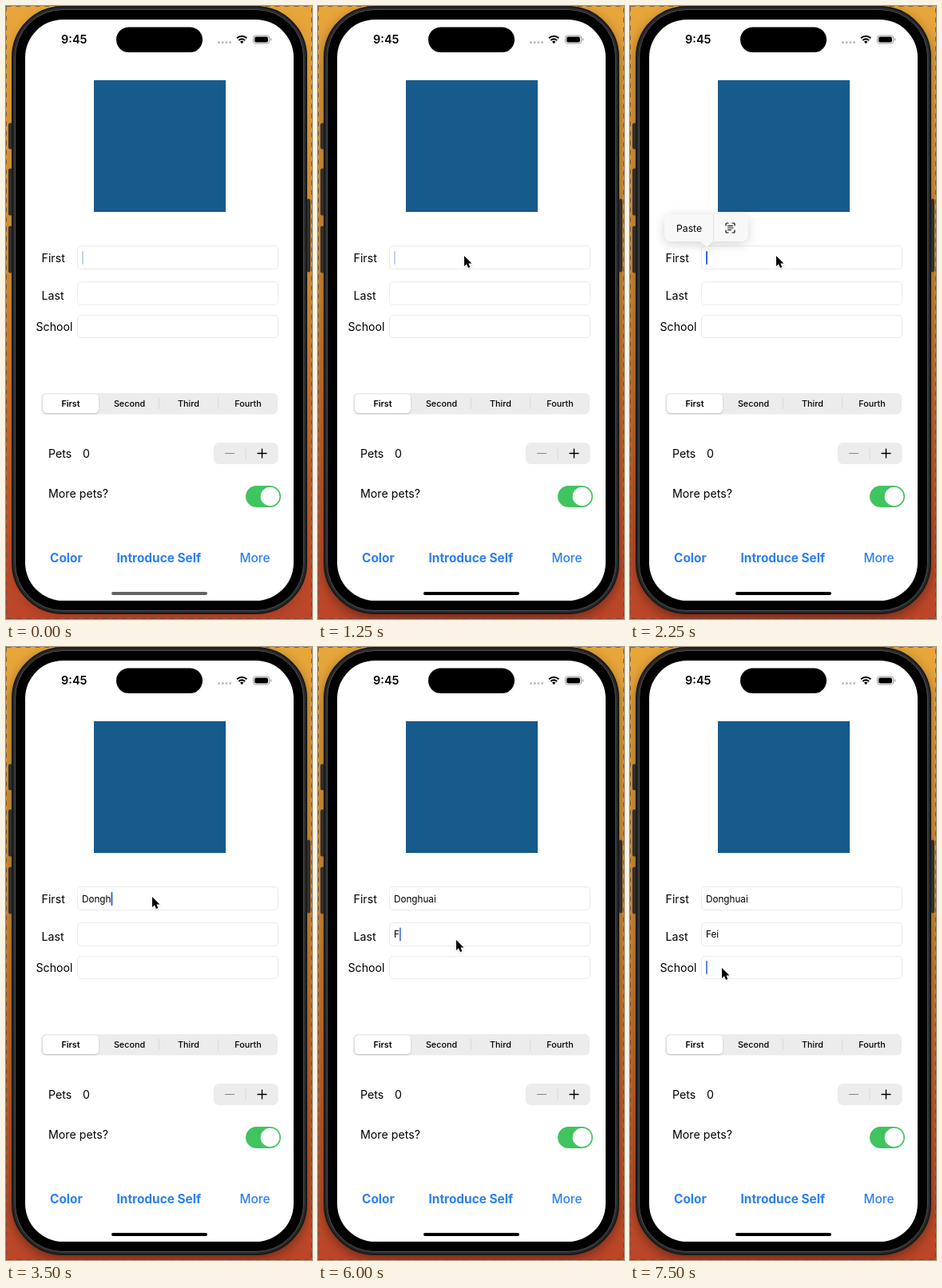
Recreate the animation shown at these times as an HTML page. Size 383 by 768 pixels, loop 8000 ms.

```html
<!DOCTYPE html>
<html lang="en">
<head>
<meta charset="utf-8">
<title>Form on a phone</title>
<style>
  html, body { margin: 0; width: 100%; height: 100%; overflow: hidden; }
  svg { display: block; width: 383px; height: 768px; }
  text { font: 14.2px Inter, "Open Sans", sans-serif; }
  .bold { font-weight: 700; font-size: 15.4px; fill: #2a7ff5; }
  .seg { font-size: 10.8px; font-weight: 500; text-anchor: middle; }
  .entry { font-size: 11.7px; }
  .field { fill: #fff; stroke: #ebebeb; }
  .line { fill: none; stroke: #000; stroke-width: 1.2; stroke-linecap: round; }
</style>
</head>
<body>
<svg viewBox="0 0 383 768">
  <defs>
    <linearGradient id="sky" x2="0" y2="1">
      <stop offset="0" stop-color="#e8a63a"/>
      <stop offset=".45" stop-color="#d48c32"/>
      <stop offset=".8" stop-color="#c45a28"/>
      <stop offset="1" stop-color="#bd4528"/>
    </linearGradient>
    <filter id="soft" x="-30%" y="-60%" width="160%" height="240%">
      <feDropShadow dx="0" dy="3" stdDeviation="7" flood-opacity=".17"/>
    </filter>
    <filter id="lift" x="-20%" y="-30%" width="140%" height="170%">
      <feDropShadow dx="0" dy="1" stdDeviation="1.2" flood-opacity=".2"/>
    </filter>
    <filter id="blur" x="-10%" y="-10%" width="120%" height="120%">
      <feGaussianBlur stdDeviation="8"/>
    </filter>
  </defs>

  <rect width="383" height="768" fill="url(#sky)"/>
  <rect id="shade" x="8" y="6" width="368" height="760" rx="63" filter="url(#blur)"/>
  <rect x=".5" y=".5" width="382" height="767" fill="none" stroke="#4a4640" stroke-opacity=".7" stroke-dasharray="6 6"/>

  <!-- phone body -->
  <path d="M5.500 149v28M5.500 206v54M5.500 278v54M378.500 244v87" stroke="#303030" stroke-width="5" stroke-linecap="round"/>
  <rect x="8" y="1" width="368" height="760" rx="63" fill="#2b2b2b" stroke="#1a1a1a" stroke-width="2"/>
  <rect x="11.500" y="4.500" width="361" height="753" rx="59.500" stroke="#505050"/>
  <rect x="24" y="17" width="336" height="728" rx="47.500" fill="#fff"/>

  <!-- status bar -->
  <text x="69" y="47.300" style="font-size:14.5px;font-weight:600">9:45</text>
  <rect x="138" y="26.500" width="108" height="31.500" rx="15.750"/>
  <path d="M266.500 45.500h15" stroke="#b9b9b9" stroke-width="3" stroke-linecap="round" stroke-dasharray="0 4.7"/>
  <path d="M289 40.300q6.200-5.200 12.400 0M291.300 43q3.900-3.200 7.800 0" fill="none" stroke="#000" stroke-width="2"/>
  <path d="M292.900 44.600q2.300-1.700 4.600 0l-2.300 2.600z"/>
  <rect x="309.500" y="37" width="20" height="10" rx="3" fill="none" stroke="#999"/>
  <rect x="311" y="38.500" width="17" height="7" rx="2"/>
  <path d="M331.500 40.500v3" stroke="#999" stroke-width="1.300"/>

  <rect x="110" y="93" width="165" height="165" fill="#175a8c"/>

  <!-- form -->
  <text x="44.500" y="321">First</text>
  <text x="44.500" y="368">Last</text>
  <text x="37.500" y="407">School</text>
  <rect class="field" x="89.500" y="300.500" width="251" height="29" rx="4.500"/>
  <rect class="field" x="89.500" y="345.500" width="251" height="29" rx="4.500"/>
  <rect class="field" x="89.500" y="387.500" width="251" height="28" rx="4.500"/>
  <text class="entry" x="95" y="319.500"></text>
  <text class="entry" x="95" y="364"></text>
  <text class="entry" x="95" y="406"></text>
  <rect id="caret" width="2" height="17" rx="1" fill="#3567dc"/>

  <rect x="44" y="485" width="296" height="26.500" rx="6" fill="#ececed"/>
  <path d="M191.500 491v14M265.500 491v14" stroke="#dadadc"/>
  <rect x="46" y="486.500" width="70" height="23.500" rx="5" fill="#fff" filter="url(#lift)"/>
  <text class="seg" x="81" y="502" style="font-weight:600">First</text>
  <text class="seg" x="154.500" y="502">Second</text>
  <text class="seg" x="228.500" y="502">Third</text>
  <text class="seg" x="303" y="502">Fourth</text>

  <text x="53" y="566">Pets</text>
  <text x="96" y="566">0</text>
  <rect x="260" y="547" width="80.500" height="27" rx="6.500" fill="#ececed"/>
  <path d="M300 553v15" stroke="#d8d8da"/>
  <path class="line" d="M274.500 560.500h11" style="stroke:#858587"/>
  <path class="line" d="M315 560.500h11M320.500 555v11" style="stroke-width:1.400"/>
  <text x="53" y="616">More pets?</text>
  <rect x="300" y="601" width="44" height="27" rx="13.500" fill="#40c45f"/>
  <circle cx="330.500" cy="614.500" r="11.800" fill="#fff"/>

  <text class="bold" x="55" y="697">Color</text>
  <text class="bold" x="138.500" y="697">Introduce Self</text>
  <text class="bold" x="292.500" y="697" style="font-weight:500">More</text>
  <rect id="home" x="132" y="734" width="120" height="4" rx="2"/>

  <g id="menu">
    <path d="M52 261h87a9 9 0 0 1 9 9v16a9 9 0 0 1-9 9h-34q-3 0-5 3l-4 4-4-4q-2-3-5-3h-35a9 9 0 0 1-9-9v-16a9 9 0 0 1 9-9z" fill="#f8f8f8" filter="url(#soft)"/>
    <path d="M104.500 261v34" stroke="#e0e0e0"/>
    <text x="58" y="282.500" style="font-size:12.200px">Paste</text>
    <path class="line" d="M120 275v-2q0-1 1-1h2M128 272h2q1 0 1 1v2M131 281v2q0 1-1 1h-2M123 284h-2q-1 0-1-1v-2M122.500 275.500h6M122.500 278h6.500M122.500 280.500h4"/>
  </g>

  <path id="pointer" d="M0 0v13l3-2.700 2 4.700 2.400-1.100-2-4.500h4.100z" stroke="#fff" stroke-width="1.600" paint-order="stroke" filter="url(#lift)"/>
</svg>
<script>
  const LOOP = 8000, STEP = 250;
  const byId = id => document.getElementById(id);
  const [shade, caret, home, menu, pointer] = ['shade', 'caret', 'home', 'menu', 'pointer'].map(byId);
  const entries = [...document.querySelectorAll('.entry')];
  const caretTops = [307, 351.5, 393];

  // Each row starts with the time from which its values hold.
  const typing = [
    { word: 'Donghuai', keys: [[0, 0], [2750, 1], [3000, 2], [3250, 4], [3500, 5], [3750, 6], [4000, 8]] },
    { word: 'Fei', keys: [[0, 0], [5750, 1], [6250, 2], [6500, 3]] },
    { word: '', keys: [[0, 0]] }
  ];
  const path = [
    [500, 214, 372], [750, 190, 327], [1000, 183, 313],
    [4500, 181, 329], [4750, 175, 359], [5000, 173, 367],
    [7000, 151, 380], [7250, 121, 398], [7500, 115, 402]
  ];
  const focus = [[0, 0], [5250, 1], [7500, 2]];
  const caretAlpha = [[0, .3], [1500, .7], [2000, 1], [5750, .8]];
  const menuAlpha = [[0, 0], [1500, .5], [1750, 1], [2750, 0]];

  const held = (keys, t) => keys.findLast(key => key[0] <= t);

  function draw(t) {
    typing.forEach(({ word, keys }, i) => {
      entries[i].textContent = word.slice(0, held(keys, t)[1]);
    });

    const active = held(focus, t)[1];
    const width = entries[active].textContent ? entries[active].getComputedTextLength() : 0;
    caret.setAttribute('x', 95 + width);
    caret.setAttribute('y', caretTops[active]);
    caret.setAttribute('opacity', held(caretAlpha, t)[1]);
    menu.setAttribute('opacity', held(menuAlpha, t)[1]);

    const focused = t >= 1250;
    shade.setAttribute('opacity', focused ? .42 : .15);
    home.setAttribute('fill', focused ? '#000' : '#626262');

    const spot = held(path, t);
    pointer.setAttribute('visibility', spot ? 'visible' : 'hidden');
    if (spot) pointer.setAttribute('transform', `translate(${spot[1]} ${spot[2]})`);
  }

  function tick() {
    draw(Math.floor(performance.now() % LOOP / STEP) * STEP);
    requestAnimationFrame(tick);
  }
  tick();
</script>
</body>
</html>
```
